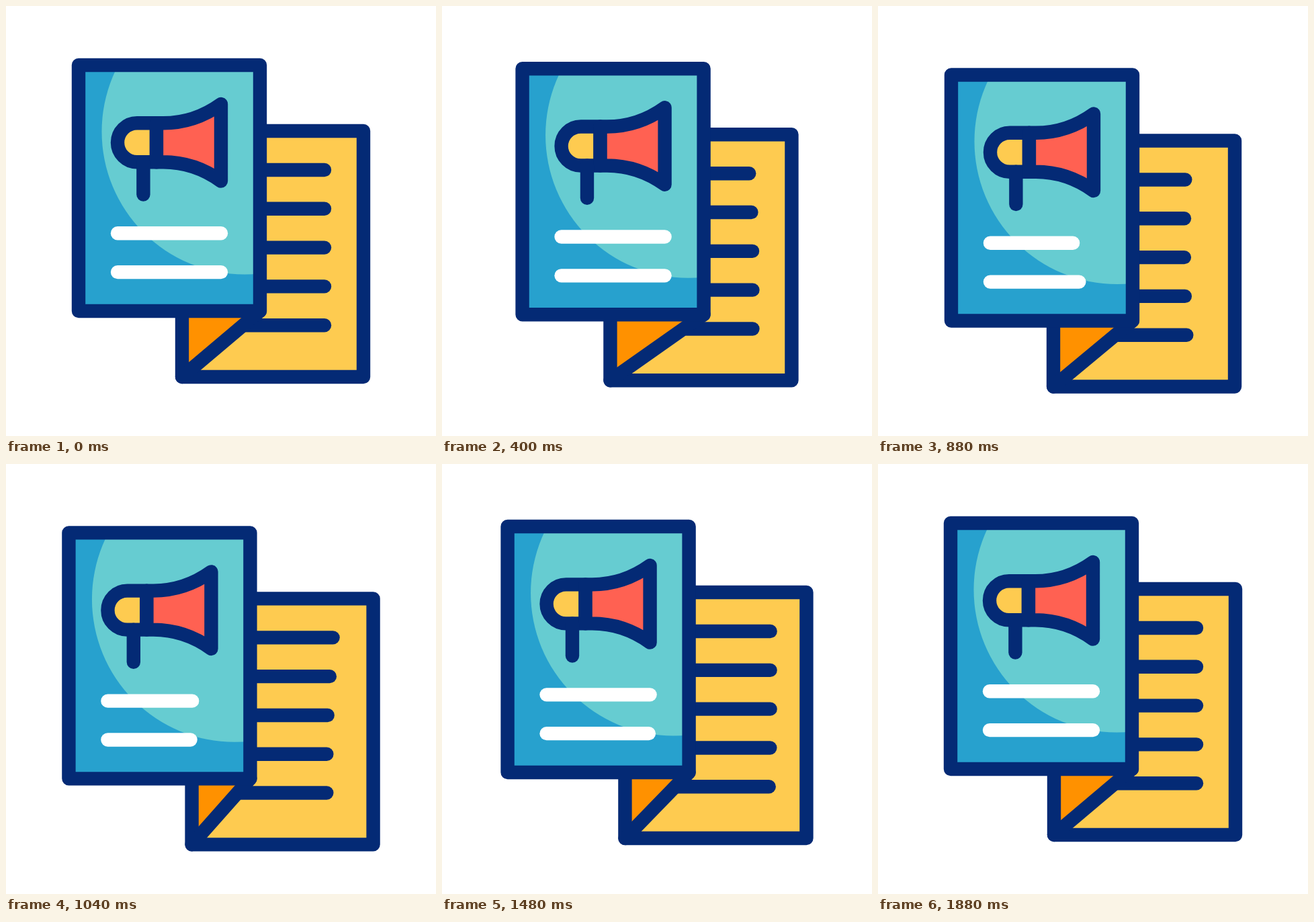
An HTML page with a canvas that plays this animation: 640 by 640 pixels, repeating every 1920 ms.

```html
<!DOCTYPE html>
<html lang="en">
<head>
<meta charset="utf-8">
<title>Flyers</title>
<style>
  html, body { margin: 0; width: 100%; height: 100%; overflow: hidden; background: #fff; }
  canvas { display: block; width: 100vmin; height: 100vmin; }
</style>
</head>
<body>
<canvas id="stage"></canvas>
<script>
const SIZE = 640, LOOP = 1920, LINE = 20.4;
const NAVY = '#042a75', YELLOW = '#fecb50', ORANGE = '#ff9100', RED = '#ff6152',
      TEAL = '#66ccd1', BLUE = '#27a1ce', WHITE = '#fff';

const canvas = document.getElementById('stage');
const ctx = canvas.getContext('2d');

// Cubic easing with control points (p1, 0) and (p2, 1), solved by bisection.
function ease(x, p1 = 0.5, p2 = 0.5) {
  let lo = 0, hi = 1;
  for (let i = 0; i < 24; i++) {
    const s = (lo + hi) / 2, r = 1 - s;
    if (3 * p1 * s * r * r + 3 * p2 * s * s * r + s * s * s < x) lo = s; else hi = s;
  }
  return lo * lo * (3 - 2 * lo);
}

// Keys are [time, value, p1, p2]; the easing leads into its key.
function track(keys, t) {
  if (t <= keys[0][0]) return keys[0][1];
  for (let i = 1; i < keys.length; i++) {
    const [t0, v0] = keys[i - 1], [t1, v1, p1, p2] = keys[i];
    if (t < t1) return v0 + (v1 - v0) * ease((t - t0) / (t1 - t0), p1, p2);
  }
  return keys[keys.length - 1][1];
}

const SWAY = [[0, 0], [624, 15.2], [1178, -18], [1256, -18], [1880, 0, 0.5, 0.2]];
const DROP = [[0, 0], [938, 14.6], [1876, 0]];
const NOTE = [[167, 0], [757, -17.2], [1300, 0]];
const CAPTION = [[440, 0], [905, -31], [930, -31], [1412, 0]];

function stroke(color = NAVY) {
  ctx.strokeStyle = color;
  ctx.stroke();
}

function line(x1, y1, x2, y2, color) {
  ctx.beginPath();
  ctx.moveTo(x1, y1);
  ctx.lineTo(x2, y2);
  stroke(color);
}

function shape(color, points) {
  ctx.beginPath();
  points.forEach(([x, y]) => ctx.lineTo(x, y));
  ctx.closePath();
  ctx.fillStyle = color;
  ctx.fill();
}

function page(x, y, color) {
  ctx.beginPath();
  ctx.rect(x, y, 270, 366);
  ctx.fillStyle = color;
  ctx.fill();
}

function frame(x, y) {
  ctx.beginPath();
  ctx.rect(x, y, 270, 366);
  stroke();
}

function backPage(t, sway) {
  const left = 262 - sway, corner = 378 + sway;
  const slide = 0.4 * Math.max(0, -sway);
  page(left, 186, YELLOW);
  shape(ORANGE, [[left, 552], [left, 454], [corner, 454]]);
  frame(left, 186);
  for (let i = 0; i < 5; i++) {
    const start = i < 4 ? corner : left + (corner - left) * 77 / 98 + 4;
    const y = 244 + i * 57.8;
    line(start, y, 474 - sway + slide + track(NOTE, t - i * 80), y);
  }
  line(left, 552, corner, 454);
}

function megaphone() {
  ctx.beginPath();
  ctx.moveTo(224, 174.3);
  ctx.lineTo(195, 174.3);
  ctx.arc(195, 203.3, 29, -Math.PI / 2, Math.PI / 2, true);
  ctx.lineTo(224, 232.3);
  ctx.closePath();
  ctx.fillStyle = YELLOW;
  ctx.fill();
  stroke();

  ctx.beginPath();
  ctx.moveTo(224, 174.3);
  ctx.lineTo(234, 174.3);
  ctx.bezierCurveTo(265, 174.3, 295, 164, 320, 146);
  ctx.lineTo(320, 260.6);
  ctx.bezierCurveTo(295, 242.6, 265, 232.3, 234, 232.3);
  ctx.lineTo(224, 232.3);
  ctx.closePath();
  ctx.fillStyle = RED;
  ctx.fill();
  stroke();

  line(204.4, 232.3, 204.4, 280.5);
}

function frontPage(t, sway) {
  ctx.save();
  ctx.translate(sway, 0);
  page(108, 88, BLUE);
  ctx.save();
  ctx.beginPath();
  ctx.rect(108, 88, 270, 366);
  ctx.clip();
  ctx.beginPath();
  ctx.arc(355, 187, 212.5, 0, Math.PI * 2);
  ctx.fillStyle = TEAL;
  ctx.fill();
  ctx.restore();
  frame(108, 88);
  megaphone();
  for (let i = 0; i < 2; i++) {
    const y = 338.3 + i * 57.8;
    line(166, y, 320 + track(CAPTION, t - i * 160), y, WHITE);
  }
  ctx.restore();
}

function draw(t) {
  const px = Math.max(1, Math.round(canvas.clientWidth * devicePixelRatio));
  if (canvas.width !== px) canvas.width = canvas.height = px;
  ctx.setTransform(px / SIZE, 0, 0, px / SIZE, 0, 0);
  ctx.fillStyle = WHITE;
  ctx.fillRect(0, 0, SIZE, SIZE);
  ctx.lineWidth = LINE;
  ctx.lineCap = ctx.lineJoin = 'round';

  const sway = track(SWAY, t);
  ctx.translate(0, track(DROP, t));
  backPage(t, sway);
  frontPage(t, sway);
}

const begin = performance.now();
function tick() {
  draw((performance.now() - begin) % LOOP);
  requestAnimationFrame(tick);
}
tick();
</script>
</body>
</html>
```
